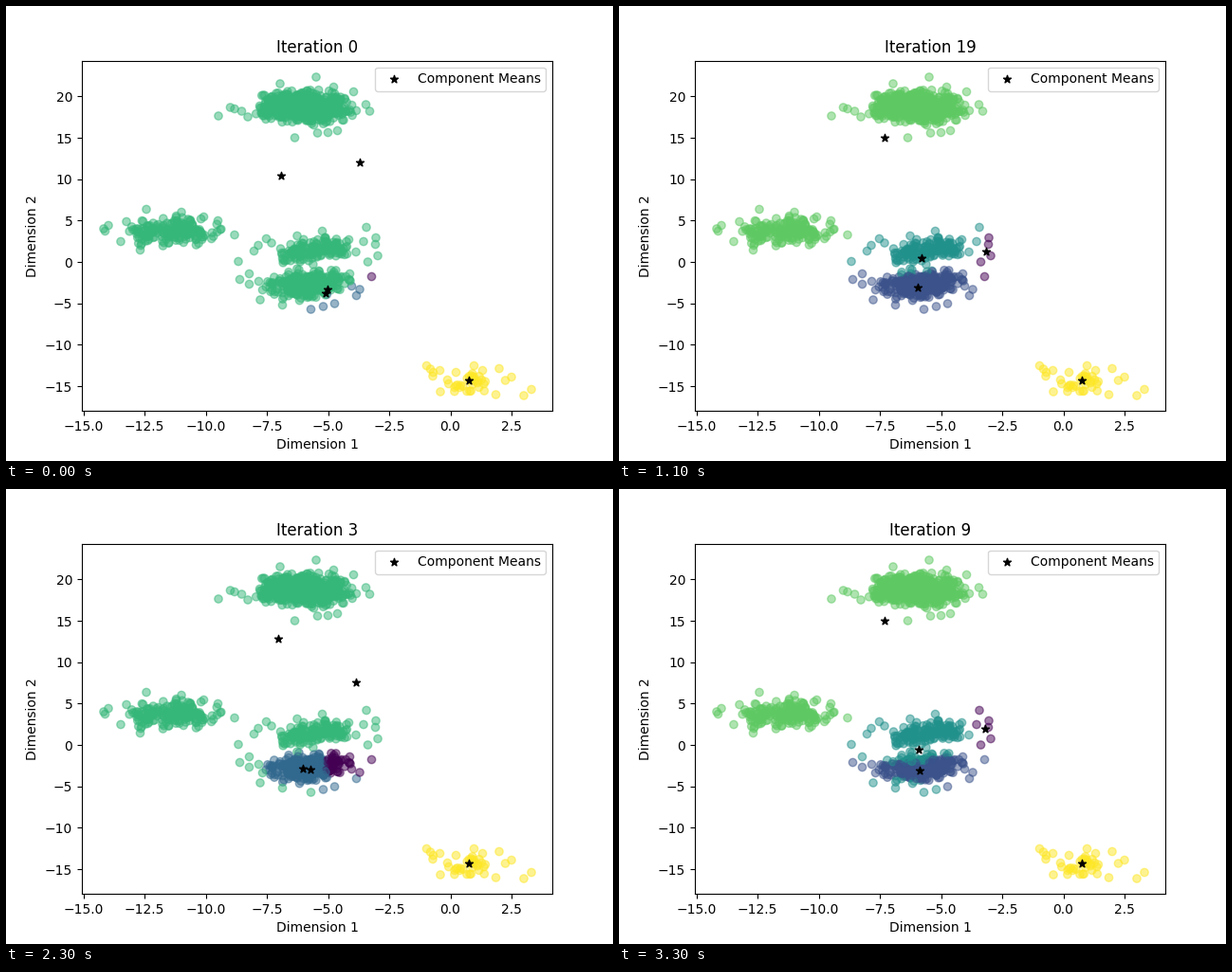
Animation, 640 px wide and 480 px high, one loop 3.4 s. Source, as a matplotlib script:

```python
import numpy as np
import matplotlib.pyplot as plt
from matplotlib.animation import FuncAnimation

rng = np.random.default_rng(4)
XLIM, YLIM = (-15.06, 4.167), (-18.0, 24.33)


def to_data(p):
    """Convert stage pixels to axis units."""
    p = np.asarray(p, float)
    x = XLIM[0] + (p[..., 0] - 79.5) / 496 * (XLIM[1] - XLIM[0])
    y = YLIM[1] - (p[..., 1] - 57.1) / 369.6 * (YLIM[1] - YLIM[0])
    return np.stack([x, y], axis=-1)


def blob(n, center, spread, reach=2.4):
    z = rng.normal(size=(2 * n, 2))
    z = z[np.hypot(z[:, 0], z[:, 1]) < reach][:n]
    return np.array(center) + z * spread


top = np.vstack([
    blob(220, (290, 105), (14, 7.5)), blob(330, (325, 106.5), (19, 8)),
    [(223.5, 115.5), (236, 106.5), (240.5, 108), (248, 110.5), (254.5, 116.5),
     (288.5, 81.5), (326.5, 74.5), (304, 138.5), (328, 133.5), (339, 133),
     (349, 131), (366, 90), (379, 103.5), (383, 110.5), (345, 85)]])
left = np.vstack([
    blob(140, (184, 236), (19, 7)), blob(40, (147, 238), (9, 7)),
    [(102.5, 234.5), (104, 237), (107.5, 231), (120.5, 248), (126.5, 227),
     (147.5, 214), (141, 257), (165, 252.5), (184.5, 217), (200, 251.5),
     (208, 222), (223, 226), (240.5, 241)]])
middle = np.vstack([
    blob(80, (336, 255), (13, 6.5)), blob(55, (307, 262), (11, 7)),
    [(244.5, 269), (261, 258), (265.5, 252), (274, 245), (279.5, 249.5),
     (306.5, 242), (333, 237), (361, 246), (368.5, 259)]])
right = np.array([(379.5, 233), (376.5, 248), (389.5, 244), (389, 251),
                  (391.5, 263), (381, 269.5), (385, 285)])
low = np.vstack([
    blob(230, (310, 294), (16, 7)), blob(60, (338, 291), (12, 6)),
    [(246, 288), (256, 282), (256, 293), (266, 290), (267.5, 309.5),
     (270, 299), (291, 315), (321, 319.5), (334, 316.5), (346, 313.5),
     (372.5, 298.5), (369, 305), (362, 282), (364, 295)]])
corner = np.vstack([
    blob(30, (486, 397), (14, 6.5), 2),
    [(443, 379), (447, 382.5), (450, 386), (457, 384), (449.5, 390),
     (457.5, 406.5), (465, 394), (474, 386), (493, 379), (502, 384),
     (519.5, 382), (532.5, 391), (526, 394.5), (516, 409.5), (545.5, 410.5),
     (553.5, 404)]])

groups = [top, left, middle, right, low, corner]
points = np.vstack(groups)
order = rng.permutation(len(points))


def label_low(it):
    x, y = low.T
    if it == 0:
        return np.where(y + 0.35 * (x - 340) > 303, 2, 3)
    if it < 6:
        size = np.interp(it, [1, 3, 5], [0.75, 1, 1.4])
        far = np.hypot((x - 320) / 50, (y - 293) / 23) > size
        lab = np.where((x > 337) & (y < 301), 1, 2)
        return np.where(far & (x < 330), 3, lab)
    above = np.interp(it, [6, 9, 13, 19, 25], [4, 8, 11, 14, 40])
    below = np.interp(it, [6, 9, 13, 19], [4, 8, 13, 40])
    bend = 0.0035 * (x - 295) ** 2
    return np.where((297 - y < above + bend) & (y - 297 < below + bend), 1, 2)


def label_right(it):
    if it < 4:
        return np.array([3] * 6 + [1])
    if it < 7:
        return np.array([3] * 4 + [2, 2, 1])
    lab = np.zeros(7, int)
    lab[0] = 0 if it < 16 else 2
    lab[1] = 0 if it < 12 else 2
    lab[6] = 1 if it < 12 else 0
    return lab


def labels(it):
    edge = np.interp(it, [4, 7], [280, 225])
    mid = np.where(middle[:, 1] > edge, 2, 3)
    parts = [np.full(len(top), 3), np.full(len(left), 3), mid,
             label_right(it), label_low(it), np.full(len(corner), 4)]
    return np.concatenate(parts)[order]


STEPS = [0, 3, 9, 13, 19, 25, 33]
PATHS = [
    ([373, 368, 385, 386, 386, 387, 387.5], [164, 203, 253, 257, 258.5, 262, 263]),
    ([338, 320, 316, 314, 314, 313, 312.5], [298, 295, 296, 296, 296, 295.5, 294.5]),
    ([336.5, 312, 315, 317, 318.5, 321.5, 323], [302, 294, 274, 270, 265, 259.5, 258.5]),
    ([289, 286, 279, 279, 279, 279, 279], [178, 157, 138.5, 138.5, 138.5, 138.5, 138.5]),
    ([487] * 7, [395] * 7),
]


def means(it):
    return to_data([[np.interp(it, STEPS, xs), np.interp(it, STEPS, ys)]
                    for xs, ys in PATHS])


# Iterations play in text order: 0, 1, 10, 11, ...
iterations = sorted(range(34), key=str)

fig, ax = plt.subplots(figsize=(6.4, 4.8), dpi=100)
dots = ax.scatter(*to_data(points[order]).T, c=labels(0), cmap="viridis", alpha=0.5)
stars = ax.scatter(*means(0).T, c="black", marker="*", label="Component Means")
ax.set(xlim=XLIM, ylim=YLIM, xlabel="Dimension 1", ylabel="Dimension 2")
title = ax.set_title("Iteration 0")
ax.legend(loc="upper right")


def update(i):
    it = iterations[i]
    dots.set_array(labels(it))
    dots.autoscale()
    stars.set_offsets(means(it))
    title.set_text(f"Iteration {it}")
    return dots, stars, title


anim = FuncAnimation(fig, update, frames=len(iterations), interval=100,
                     repeat=True, repeat_delay=0)
plt.show()
```
